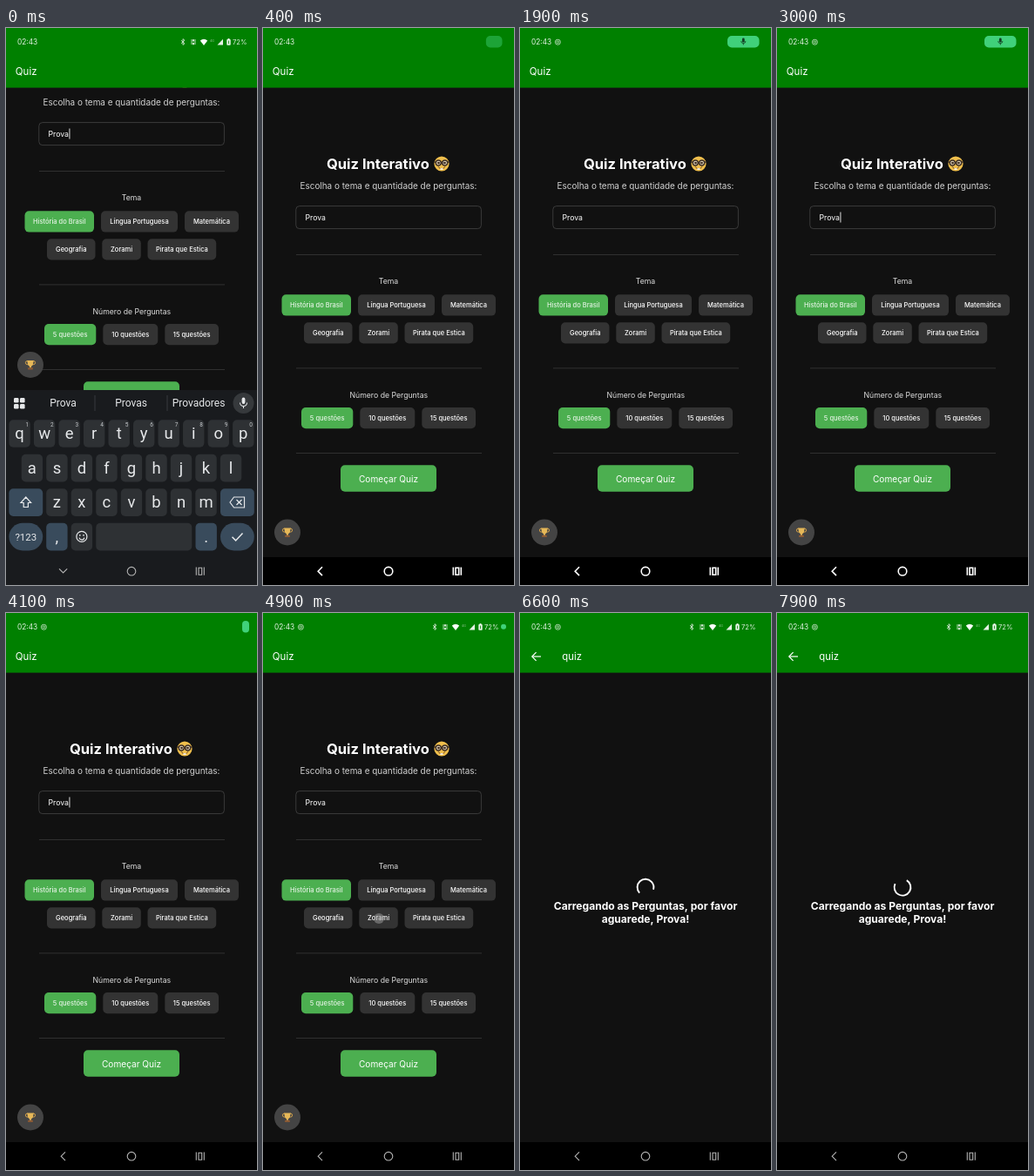
An HTML page with a canvas for the animation above (8 s loop, 288 by 640 pixels).

```html
<!DOCTYPE html>
<html lang="pt-BR">
<head>
<meta charset="utf-8">
<title>Quiz</title>
<style>
html, body { margin: 0; width: 100%; height: 100%; overflow: hidden; background: #111; }
canvas { display: block; width: 288px; height: 640px; }
</style>
</head>
<body>
<canvas id="stage"></canvas>
<script>
const W = 288, H = 640, LOOP = 8000, TAU = Math.PI * 2;
const HEAD = 68.6, NAV = 608, KEYS_TOP = 416;
const GREEN = '#4caf50', GRAY = '#333';
const canvas = document.getElementById('stage');
const ctx = canvas.getContext('2d');
const dpr = window.devicePixelRatio || 1;
canvas.width = W * dpr;
canvas.height = H * dpr;

const player = 'Prova';
const clamp = v => Math.max(0, Math.min(1, v));
const ramp = (t, a, b) => clamp((t - a) / (b - a));
const mix = (a, b, p) => a + (b - a) * p;
const easeOut = p => 1 - (1 - p) ** 3;
const easeBoth = p => p < .5 ? 4 * p ** 3 : 1 - 4 * (1 - p) ** 3;

// cubic-bezier(.4, 0, .2, 1), solved by bisection
function fastOutSlowIn(p) {
  let lo = 0, hi = 1, s = .5;
  for (let i = 0; i < 20; i++) {
    s = (lo + hi) / 2;
    const x = 1.2 * s * (1 - s) ** 2 + .6 * s * s * (1 - s) + s ** 3;
    if (x < p) lo = s; else hi = s;
  }
  return s * s * (3 - 2 * s);
}

function rect(x, y, w, h, color) {
  ctx.fillStyle = color;
  ctx.fillRect(x, y, w, h);
}
function box(x, y, w, h, r, color) {
  ctx.beginPath();
  ctx.roundRect(x, y, w, h, r);
  ctx.fillStyle = color;
  ctx.fill();
}
function disc(x, y, r, color) {
  ctx.beginPath();
  ctx.arc(x, y, r, 0, TAU);
  ctx.fillStyle = color;
  ctx.fill();
}
function ring(x, y, r, color, lw, a = 0, b = TAU) {
  ctx.beginPath();
  ctx.arc(x, y, r, a, b);
  ctx.strokeStyle = color;
  ctx.lineWidth = lw;
  ctx.stroke();
}
function trace(pts) {
  ctx.beginPath();
  for (let i = 0; i < pts.length; i += 2) ctx.lineTo(pts[i], pts[i + 1]);
}
function line(pts, color, lw = 1, close) {
  trace(pts);
  if (close) ctx.closePath();
  ctx.strokeStyle = color;
  ctx.lineWidth = lw;
  ctx.stroke();
}
function poly(pts, color) {
  trace(pts);
  ctx.fillStyle = color;
  ctx.fill();
}
function text(s, x, y, size, color = '#fff', weight = 400, align = 'center', family = 'Inter') {
  ctx.font = `${weight} ${size}px ${family}, sans-serif`;
  ctx.textAlign = align;
  ctx.textBaseline = 'alphabetic';
  ctx.fillStyle = color;
  ctx.fillText(s, x, y);
}
function faded(alpha, draw) {
  if (alpha <= 0) return;
  ctx.save();
  ctx.globalAlpha *= alpha;
  draw();
  ctx.restore();
}
function shifted(x, y, draw) {
  ctx.save();
  ctx.translate(x, y);
  draw();
  ctx.restore();
}

function nerdFace(x, y) {
  shifted(x, y, () => {
    disc(0, 0, 8.6, '#f0bf4c');
    for (const side of [-1, 1]) {
      disc(side * 3.7, -1, 2.9, '#e9dcc0');
      ring(side * 3.7, -1, 3, '#3f3026', 1.5);
      disc(side * 3.5, -.9, 1.4, '#3b2a20');
    }
    line([-8.8, -2, -6.7, -2], '#3f3026', 1.3);
    line([6.7, -2, 8.8, -2], '#3f3026', 1.3);
    ring(0, 1.6, 4.2, '#6b4423', 1, .4, Math.PI - .4);
    rect(-1.6, 5.2, 3.2, 1.6, '#fff');
  });
}

function trophy(x, y) {
  shifted(x, y, () => {
    disc(0, 0, 15, '#444');
    ring(-3.6, -2.4, 2, '#d3a24a', 1);
    ring(3.6, -2.4, 2, '#d3a24a', 1);
    poly([-3.8, -5, 3.8, -5, 2.8, .2, .9, 2, .9, 3.5, -.9, 3.5, -.9, 2, -2.8, .2], '#e6b858');
    rect(-2.8, 3.2, 5.6, 2.3, '#8a5a35');
  });
}

function option(label, x, y, w, on) {
  box(x, y, w, 24.3, 5, on ? GREEN : GRAY);
  text(label, x + w / 2, y + 15, 7.5, on ? '#e4f3e4' : '#fff', 500);
}

function form(t) {
  const typing = t < 100;
  const second = t >= 5000;
  ctx.save();
  ctx.beginPath();
  ctx.rect(0, HEAD, W, NAV - HEAD);
  ctx.clip();
  ctx.translate(0, typing ? -96 : 0);

  text('Quiz Interativo', 73, 161.8, 16.5, '#fff', 700, 'left');
  nerdFace(205, 156);
  text('Escolha o tema e quantidade de perguntas:', 144, 185.3, 9.93, '#d2d2d2');

  ctx.beginPath();
  ctx.roundRect(37.8, 204.6, 212.6, 26, 4);
  ctx.strokeStyle = '#3b3b3b';
  ctx.lineWidth = 1;
  ctx.stroke();
  text(player, 48.5, 221, 8.7, '#fff', 400, 'left');
  if ((t + 95) % 1000 < 490) {
    rect(49 + ctx.measureText(player).width, 211.5, 1, 12, '#ddd');
  }

  for (const y of [260, 390.4, 488]) rect(38, y, 213, 1, '#303030');

  text('Tema', 144, 294.4, 8.7, '#ddd');
  option('História do Brasil', 21.5, 306.3, 79.5, !second);
  option('Língua Portuguesa', 109, 306.3, 88, false);
  option('Matemática', 205, 306.3, 62, false);
  option('Geografia', 47, 338.2, 55.5, false);
  option('Zorami', 110.3, 338.2, 44.5, second);
  option('Pirata que Estica', 162.5, 338.2, 78.7, false);

  text('Número de Perguntas', 144.3, 424.5, 8.7, '#ddd');
  option('5 questões', 44, 436, 59.3, true);
  option('10 questões', 111.3, 436, 63, false);
  option('15 questões', 182.3, 436, 61.7, false);

  const press = ramp(t, 5550, 5690) * (1 - ramp(t, 5780, 5950));
  faded(1 - .42 * press, () => {
    box(89, 502.3, 110, 30.4, 5, GREEN);
    text('Começar Quiz', 144, 521.5, 10.1);
  });
  ctx.restore();
  trophy(28, typing ? 387 : 579.5);
}

function touch(t, x, y, a, b) {
  if (t >= a && t < b) faded(.5, () => disc(x, y, 6, '#a0a0a0'));
}

function formPage(t) {
  rect(0, 0, W, H, '#111');
  form(t);
  rect(0, 0, W, HEAD, '#008000');
  text('Quiz', 10.8, 54, 11.5, '#fff', 400, 'left');
}

function spinner(t) {
  const c = (t - 6600) / 1200 + .29;
  const f = c - Math.floor(c);
  const tail = fastOutSlowIn(ramp(f, .5, 1)), tip = fastOutSlowIn(ramp(f, 0, .5));
  const base = 69 + 144 * c + 90 * f;
  const rad = d => d * Math.PI / 180;
  ring(144, 315.2, 9.4, '#fff', 1.9, rad(base + 270 * tail), rad(base + 270 * tip + 6));
}

function loadingPage(t) {
  rect(0, 0, W, H, '#111');
  rect(0, 0, W, HEAD, '#008000');
  line([24, 50, 14, 50], '#fff', 1.2);
  line([18.6, 45.2, 13.8, 50, 18.6, 54.8], '#fff', 1.2);
  text('quiz', 48.3, 54, 11.3, '#fff', 400, 'left');
  spinner(t);
  text('Carregando as Perguntas, por favor', 144, 341.3, 12.1, '#fff', 700);
  text(`aguarede, ${player}!`, 144, 356.3, 12.1, '#fff', 700);
}

function statusIcons(x) {
  const c = '#e6f2e6';
  shifted(x, 16, () => {
    line([-2, -1.8, 2, 1.8, 0, 3.4, 0, -3.4, 2, -1.8, -2, 1.8], c, .8);
    line([10, -3, 10, 3], c, .8);
    line([14, -3, 14, 3], c, .8);
    box(11.1, -3, 1.8, 2.4, .5, c);
    box(11.1, .8, 1.8, 2.4, .5, c);
    ctx.beginPath();
    ctx.moveTo(24, 4);
    ctx.lineTo(19.8, -1.5);
    ctx.quadraticCurveTo(24, -5, 28.2, -1.5);
    ctx.fillStyle = '#fff';
    ctx.fill();
    text('4G', 33.5, -.5, 3.6, '#9cc79c');
    poly([39.5, 3.6, 46, 3.6, 46, -3.2], c);
    box(50.3, -3, 4.4, 6.8, .8, c);
    rect(51.5, -4, 2, 1.2, c);
    line([52.5, -1.4, 52.5, 2.2], '#008000', .8);
    text('72%', 57, 3, 7.6, c, 400, 'left');
  });
}

function recordChip(t) {
  if (t < 300 || t >= 5300) return;
  const grow = ramp(t, 300, 570);
  const shrink = easeBoth(ramp(t, 3750, 4080));
  const drop = ramp(t, 4110, 4300);
  const right = mix(274.5, 279, shrink);
  const w = mix(mix(mix(8, 36.5, grow), 8, shrink), 6, drop);
  const h = mix(13.5, 6, drop);
  const fade = mix(.45, 1, ramp(t, 400, 650)) * (1 - ramp(t, 5150, 5300));
  faded(fade, () => box(right - w, 15.7 - h / 2, w, h, Math.min(5, w / 2), '#40d17a'));
  faded(ramp(t, 500, 700) * (1 - ramp(t, 3750, 3880)), () => {
    box(254.9, 11.6, 2.8, 5, 1.4, '#123c22');
    ring(256.3, 15, 2.6, '#123c22', .8, 0, Math.PI);
    line([256.3, 17.6, 256.3, 19.4], '#123c22', .9);
  });
}

function statusBar(t) {
  text('02:43', 13, 19.2, 8.3, '#e6f2e6', 400, 'left');
  if (t >= 700) {
    ring(43.4, 16.2, 3, '#d9ead9', .8);
    ring(43.4, 16.2, 1.3, '#d9ead9', .8);
  }
  if (t < 300) statusIcons(203);
  else faded(ramp(t, 4250, 4450), () => statusIcons(197));
  recordChip(t);
}

function navBar(t) {
  const bright = t >= 250 && t < 3900;
  const c = bright ? '#fff' : '#b4b4b4';
  const lw = bright ? 1.6 : 1.1;
  if (t < 100) line([61, 621.3, 65.6, 625.9, 70.2, 621.3], c, lw);
  else line([68, 619.3, 63.2, 624.2, 68, 629.1], c, lw);
  ring(144, 624.2, 4.8, c, lw);
  line([218.3, 619.6, 218.3, 628.8], c, lw);
  line([227.3, 619.6, 227.3, 628.8], c, lw);
  line([221, 620.2, 224.7, 620.2, 224.7, 628.2, 221, 628.2], c, lw, true);
}

function key(x, y, w, label, special, r = 5) {
  box(x, y, w, 31.6, r, special ? '#394b5c' : '#2e3134');
  if (label) {
    const small = label.length > 1;
    text(label, x + w / 2, y + (small ? 20 : 22), small ? 11.5 : 18.5, '#e6e8ea', 400, 'center', 'Roboto');
  }
}

function keyboard(t) {
  const slide = easeBoth(ramp(t, 100, 340));
  if (slide >= 1) return;
  const face = '#e6e8ea';
  ctx.save();
  ctx.translate(0, slide * (H - KEYS_TOP));
  rect(0, KEYS_TOP, W, H - KEYS_TOP, '#191b1e');

  for (const x of [9, 16]) for (const y of [425, 432]) box(x, y, 5.6, 5.6, 1.4, face);
  text(player, 65.5, 435.3, 12, face, 400, 'center', 'Roboto');
  text(player + 's', 143.5, 435.3, 12, face, 400, 'center', 'Roboto');
  text('Provadores', 221, 435.3, 12, face, 400, 'center', 'Roboto');
  rect(101.5, 422, 1, 18, '#383b3e');
  rect(184.5, 422, 1, 18, '#383b3e');
  disc(272.5, 431, 12, '#36393c');
  box(270.6, 424.6, 3.8, 7.4, 1.9, face);
  ring(272.5, 430.5, 4, face, 1.1, 0, Math.PI);
  line([272.5, 434.5, 272.5, 437], face, 1.1);

  const rows = [['qwertyuiop', 3.4, 450.2], ['asdfghjkl', 17.7, 489.8], ['zxcvbnm', 46.2, 529.3]];
  rows.forEach(([letters, x, y], n) => {
    [...letters].forEach((ch, i) => {
      const kx = x + i * 28.52;
      key(kx, y, 24.4, ch);
      if (!n) text((i + 1) % 10, kx + 21, y + 8, 6.5, '#c4c7ca', 400, 'center', 'Roboto');
    });
  });

  key(3.4, 529.3, 38.8, '', true);
  line([17, 545.5, 22.8, 539, 28.6, 545.5, 25.4, 545.5, 25.4, 550.5, 20.2, 550.5, 20.2, 545.5], face, 1.2, true);
  key(246, 529.3, 38.8, '', true);
  line([257, 545, 261.5, 539, 273.5, 539, 273.5, 551, 261.5, 551], face, 1.2, true);
  line([264.5, 542, 270.5, 548], face, 1.2);
  line([270.5, 542, 264.5, 548], face, 1.2);

  key(3.4, 568.8, 38.8, '?123', true, 15.8);
  key(46.2, 568.8, 24.4, ',', true);
  key(74.7, 568.8, 24.4);
  ring(86.9, 584.4, 6, face, 1.2);
  disc(84.8, 582.8, .9, face);
  disc(89, 582.8, .9, face);
  ring(86.9, 585, 3, face, 1.2, .2, Math.PI - .2);
  key(103.3, 568.8, 110, '');
  key(217.5, 568.8, 24.4, '.', true);
  key(246, 568.8, 38.8, '', true, 15.8);
  line([259.5, 584.8, 263.6, 588.9, 271.5, 580.5], face, 1.5);
  ctx.restore();
}

function draw(t) {
  ctx.setTransform(dpr, 0, 0, dpr, 0, 0);
  const enter = easeOut(ramp(t, 5850, 6200));
  if (enter < 1) formPage(t);
  if (enter > 0) {
    faded(enter, () => shifted(29 * (1 - enter), 0, () => loadingPage(t)));
  }
  rect(0, NAV, W, H - NAV, '#000');
  keyboard(t);
  statusBar(t);
  navBar(t);
  touch(t, 133, 351, 4880, 5040);
  touch(t, 166, 522, 5560, 5780);
}

function tick(now) {
  draw(now % LOOP);
  requestAnimationFrame(tick);
}
draw(0);
requestAnimationFrame(tick);
</script>
</body>
</html>
```
